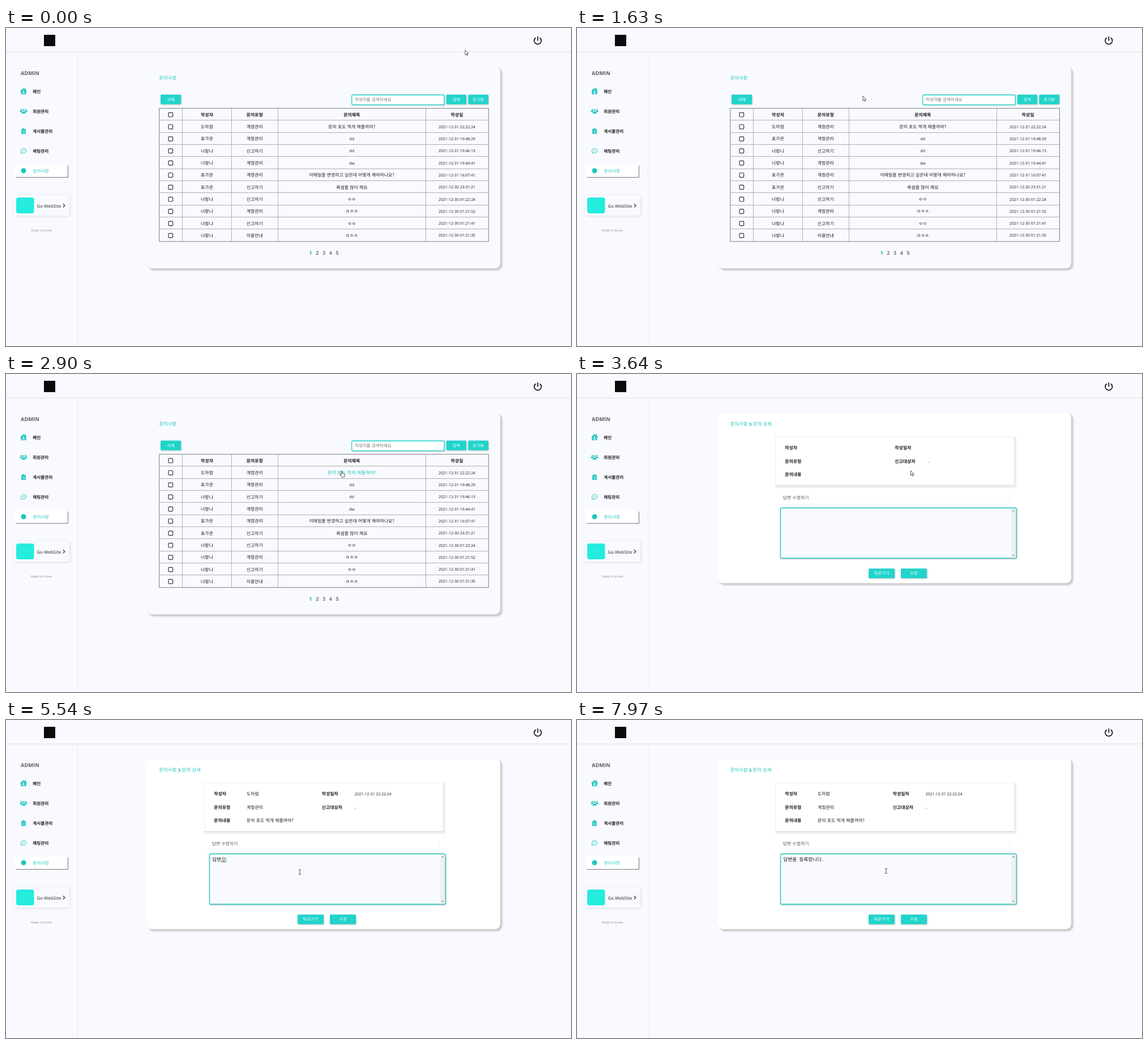
Write an HTML page that moves like this. It is 998 px wide and 561 px high and loops after 8000 ms.

```html
<!DOCTYPE html>
<html lang="ko">
<head>
<meta charset="utf-8">
<title>문의사항</title>
<style>
html, body { margin: 0; width: 100%; height: 100%; overflow: hidden; background: #f9faff; }
svg { display: block; width: 998px; height: 561px; }
text { font-family: "Noto Sans CJK KR", "Noto Sans KR", "Noto Sans CJK", sans-serif; text-rendering: geometricPrecision; white-space: pre; }
.lat { font-family: "Open Sans", "Noto Sans", sans-serif; }
.mono { font-family: "Noto Sans Mono CJK KR", "Noto Sans CJK KR", monospace; }
.card { filter: drop-shadow(3.5px 3.5px 1.5px #c9cac9) drop-shadow(0 0 .6px #d4d5d6); }
.btn { filter: drop-shadow(1.5px 1.5px 1px #bcc2c4); }
.soft { filter: drop-shadow(1px 1px 2px #dadce1); }
</style>
</head>
<body>
<svg id="stage" viewBox="0 0 998 561" xmlns="http://www.w3.org/2000/svg"></svg>
<script>
const LOOP = 8000, TEAL = '#22c6be', FILL = '#21d4cb', BG = '#f9faff', INK = '#1c1c1e';
const stage = document.getElementById('stage');

// Text placed by its vertical middle
function text(x, mid, str, size, o = {}) {
  return `<text x="${x}" y="${(mid + size * .365).toFixed(2)}" font-size="${size}" fill="${o.fill || INK}"` +
    ` font-weight="${o.w || 400}" text-anchor="${o.at || 'start'}" class="${o.cls || ''}" id="${o.id || ''}">${str}</text>`;
}
const mid = (x, y, str, size, o = {}) => text(x, y, str, size, { ...o, at: 'middle' });
const rect = (x, y, w, h, fill, more = '') =>
  `<rect x="${x}" y="${y}" width="${w}" height="${h}" fill="${fill}" ${more}/>`;
const line = (x1, y1, x2, y2, color, w = 1) =>
  `<path d="M${x1} ${y1}L${x2} ${y2}" stroke="${color}" stroke-width="${w}"/>`;
const chevron = (x, y, color, w) =>
  `<path d="M${x} ${y - 3}l3 3l-3 3" fill="none" stroke="${color}" stroke-width="${w}"/>`;
const button = (x, y, w, label) =>
  rect(x, y, w, 17, FILL, 'rx="1.5" class="btn"') + mid(x + w / 2, y + 8.5, label, 7.3, { fill: '#fff' });

function frame() {
  const items = [[112, '메인'], [147.5, '회원관리'], [182.5, '게시물관리'], [217.5, '채팅관리']];
  return rect(0, 0, 998, 561, BG) +
    line(0, 42, 998, 42, '#e6e8ed', 1.4) + line(0, 43.5, 998, 43.5, '#f2f4f8', 1.5) +
    line(126, 43, 126, 561, '#eceef3', 1.4) +
    rect(67, 12, 20, 20, '#0b0b0b') +
    '<path d="M935.7 17.2a6.3 6.3 0 1 0 7.2 0M939.3 15v7.4" fill="none" stroke="#111" stroke-width="1.7"/>' +
    text(26, 79.3, 'ADMIN', 9.3, { w: 700, fill: '#5c5e62', cls: 'lat' }) +
    items.map(([y, s]) => text(47.3, y, s, 7.6, { w: 700 })).join('') +
    icons() +
    rect(16, 241, 93, 22, '#fff', 'rx="2" style="filter:drop-shadow(1px 1px .7px #777)"') +
    `<circle cx="31" cy="251.7" r="4.5" fill="${TEAL}"/>` +
    text(47.5, 252.3, '문의사항', 7.7, { fill: TEAL, w: 500 }) +
    rect(14, 295, 98, 36, BG, 'rx="3" class="soft"') +
    rect(18, 299, 31.5, 28, '#25ecdf', 'rx="4"') +
    text(54.5, 314.2, 'Go WebSite', 7.8, { w: 600, fill: '#55585c', cls: 'lat' }) +
    chevron(100.8, 313.3, '#44474b', 1.5) +
    mid(62.5, 357, 'Made in Korea', 5.5, { fill: '#8b8d91', cls: 'lat' });
}

function icons() {
  const person = (x, y, r) => `<circle cx="${x}" cy="${y}" r="${r}"/>` +
    `<path d="M${x - r * 1.9} ${y + r * 3.4}v-${r}q0-${r} ${r}-${r}h${r * 1.8}q${r} 0 ${r} ${r}v${r}z"/>`;
  return `<g fill="${TEAL}">
    <path d="M31 106l6 5.2l-.8 .8l-.6-.5v5.3h-9.2v-5.3l-.6 .5l-.8-.8zM33.4 106.3h1.8v3h-1.8z"/>
    <circle cx="31" cy="111.2" r="1.2" fill="${BG}"/><path d="M28.8 115.3q0-2 2.2-2t2.2 2z" fill="${BG}"/>` +
    person(27, 144, 1.3) + person(35, 144, 1.3) +
    `<g stroke="${BG}" stroke-width=".5">${person(31, 144.8, 1.9)}</g>
    <path d="M27 178.2h2.4a1.6 1.6 0 0 1 3.2 0h2.4v8.8h-8z"/>
    <path d="M28.4 181.3h1m1 0h3.2m-5.2 2h1m1 0h3.2m-5.2 2h1m1 0h3.2" stroke="${BG}" stroke-width=".7"/>
    <path d="M31 212.8c3 0 4.9 1.8 4.9 3.9s-1.9 3.9-4.9 3.9c-.9 0-1.5-.1-2.2-.4q-1.2 .9-2.5 .9q.8-1 .9-2c-.7-.7-1.1-1.5-1.1-2.4c0-2.1 1.9-3.9 4.9-3.9z" fill="none" stroke="${TEAL}" stroke-width="1"/>
    <circle cx="28.9" cy="216.7" r=".7"/><circle cx="31" cy="216.7" r=".7"/><circle cx="33.1" cy="216.7" r=".7"/></g>`;
}

const ACC = '계정관리', REP = '신고하기', A = '도하람', B = '표가온', C = '너랑나';
const TITLE = '문의 포도 먹게 해줄꺼야?', DATE = '2021-12-31 22:22:24';
const rows = [
  [A, ACC, TITLE, DATE],
  [B, ACC, 'dd', '2021-12-31 19:48:29'],
  [C, REP, 'dd', '2021-12-31 19:46:13'],
  [C, ACC, 'dw', '2021-12-31 19:44:41'],
  [B, ACC, '이메일을 변경하고 싶은데 어떻게 해야하나요?', '2021-12-31 16:07:41'],
  [B, REP, '욕설을 많이 해요', '2021-12-30 23:31:21'],
  [C, REP, 'ㅇㅇ', '2021-12-30 01:22:24'],
  [C, ACC, 'ㅁㅈㅇ', '2021-12-30 01:21:52'],
  [C, REP, 'ㅇㅇ', '2021-12-30 01:21:41'],
  [C, '이용안내', 'ㅁㅈㅇ', '2021-12-30 01:21:35']
];

function listPage() {
  const cols = [311.5, 398.5, 480.5, 741.5], centers = [355, 439.3, 610.8, 796.5];
  const top = 142, step = 21.32;
  let s = rect(249, 67.5, 624, 356.5, BG, 'rx="9" class="card"') +
    text(270.4, 88.2, '문의사항', 8.4, { fill: TEAL }) +
    button(273, 117.6, 36, '삭제') + button(777.7, 117.6, 35.3, '검색') + button(816.3, 117.6, 35.7, '초기화') +
    rect(610.8, 118, 163.2, 17.4, '#fff', `rx="2" stroke="${FILL}" stroke-width="1.3" class="btn"`) +
    text(616, 126.3, '작성자를 검색하세요', 7.55, { fill: '#777' });
  for (let i = 1; i < 11; i++) {
    const y = Math.round(top + i * step) - .5;
    s += line(270, y, 852.5, y, '#a6a8ad', .9);
  }
  s += cols.map(x => line(x, 142, x, 376.5, '#a6a8ad', .9)).join('') +
    rect(270.6, 141.6, 581.8, 235, 'none', 'stroke="#909296" stroke-width="1.2"');
  [['작성자', '문의유형', '문의제목', '작성일'], ...rows].forEach((r, i) => {
    const y = top + (i + .5) * step - .1;
    s += rect(287, y - 3.4, 7.6, 7.6, '#fff', 'rx="1.2" stroke="#333" stroke-width="1.2"');
    r.forEach((v, j) => {
      const lat = /^[a-z\d]/.test(v);
      s += mid(centers[j], y + .2, v, lat ? 6.9 : 7.9,
        { w: i ? 400 : 700, cls: lat ? 'lat' : '', id: v === TITLE ? 'link' : '' });
    });
  });
  for (let n = 1; n < 6; n++)
    s += mid(526.2 + n * 11.75, 397.2, n, 9, { w: 700, fill: n > 1 ? '#727478' : '#22b9a8', cls: 'lat' });
  return s;
}

function detailPage() {
  const bold = { w: 700 };
  const right = (x, dash) => text(x, 130.5, '작성일자', 7.9, bold) +
    text(x, 154, '신고대상자', 7.9, bold) + text(dash, 154.6, '-', 8, { cls: 'lat' });
  return rect(249, 67.5, 624, 301.5, '#fff', 'rx="9" class="card"') +
    text(270.4, 88.2, '문의사항', 8.4, { fill: TEAL, w: 500 }) + chevron(304.6, 88.7, TEAL, 1.6) +
    text(310.6, 88.2, '문의 상세', 8.4, { fill: TEAL, w: 500 }) +
    rect(350, 110.5, 426, 90.5, '#efefef') + rect(351, 111.5, 421, 84.5, '#fff') +
    line(351, 196.5, 772.5, 196.5, '#d6d6d6') + line(772.5, 111.5, 772.5, 197, '#e2e2e2') +
    text(367.3, 130.5, '작성자', 7.9, bold) + text(367.3, 154, '문의유형', 7.9, bold) +
    text(367.3, 177.3, '문의내용', 7.9, bold) +
    `<g id="blank">${right(561.2, 620.5)}</g><g id="data">${right(557.8, 615.5)}` +
    text(425, 130.5, A, 7.9) + text(425, 154, ACC, 7.9) + text(425, 177.3, TITLE, 7.9) +
    text(615.7, 130.8, DATE, 6.9, { cls: 'lat' }) + '</g>' +
    line(764.5, 207, 764.5, 229, '#f3f3f3') + line(351, 229.5, 764, 229.5, '#f8f8f8') +
    text(363.7, 217.7, '답변 수정하기', 7.9, { fill: '#55585c', w: 500 }) +
    rect(359.5, 236.3, 416.5, 88.7, BG, `rx="2" stroke="${TEAL}" stroke-width="1.4" class="btn"`) +
    rect(767, 237, 8.2, 87.3, '#f0f0f1') +
    '<path d="M769 242.2l2-2.2l2 2.2zM769 319l2 2.2l2-2.2z" fill="#7b7d80"/>' +
    text(364.4, 246, '', 8.6, { cls: 'mono', id: 'reply' }) +
    `<path id="under" stroke="${INK}" stroke-width=".7"/><path id="caret" stroke="${TEAL}" stroke-width=".8"/>` +
    button(515, 343.3, 46, '뒤로가기') + button(572, 343.3, 46, '수정');
}

// Pointers are drawn with the hot spot at 0,0
const pointers = `<g id="arrow" fill="#fff" stroke="#222" stroke-width=".75" stroke-linejoin="round">
  <path d="M0 0v8.4l1.9-1.8l1.3 2.9l1.4-.6l-1.3-2.9h2.6z"/></g>
  <g id="hand" fill="#fff" stroke="#222" stroke-width=".75" stroke-linejoin="round">
  <path d="M-.9 .6q.9-1 1.7 0v3.6q1.2-.6 1.7 .3q1.1-.4 1.5 .5q1.2-.2 1.3 .8v2.6q-.1 1.3-1 2.7h-4.1q-1.2-1.7-2.8-3.7q-.3-1.1 .7-1.1l1 .9z"/></g>
  <path id="beam" d="M-2.2-4q1.7-.2 2.2 .7q.5-.9 2.2-.7M-2.2 4.5q1.7 .2 2.2-.7q.5 .9 2.2 .7M0-3.3v7.1" fill="none" stroke="#222" stroke-width=".8"/>`;

stage.innerHTML = frame() + `<g id="list">${listPage()}</g><g id="detail">${detailPage()}</g>` + pointers;
const $ = id => document.getElementById(id);
const show = (id, on) => $(id).style.display = on ? '' : 'none';

const path = [
  [0, 811, 39], [930, 811, 39], [970, 808, 40], [1200, 808, 40], [1630, 505, 120], [2290, 505, 120],
  [2470, 519, 140], [2890, 593, 171], [3600, 593, 171], [3640, 589.5, 170.5], [3880, 589.5, 170.5],
  [4140, 519, 268], [7650, 519, 268], [7970, 546, 266], [8000, 546, 266]
];
function pointerAt(t) {
  const i = path.findIndex(p => p[0] > t);
  const [t0, x0, y0] = path[i - 1], [t1, x1, y1] = path[i];
  let k = (t - t0) / (t1 - t0);
  if (Math.abs(x1 - x0) > 100) k = k * k * (3 - 2 * k);
  return [x0 + (x1 - x0) * k, y0 + (y1 - y0) * k];
}

// Each key press of the Hangul input: time and the text so far
const keys = [
  [4840, 'ㄷ'], [5010, '다'], [5090, '답'], [5180, '답ㅂ'], [5270, '답벼'], [5350, '답변'],
  [5440, '답변ㅇ'], [5540, '답변으'], [5640, '답변을'], [5700, '답변을 '], [5770, '답변을 ㄷ'],
  [5870, '답변을 드'], [5940, '답변을 등'], [6040, '답변을 등ㄹ'], [6140, '답변을 등로'],
  [6210, '답변을 등록'], [6310, '답변을 등록ㅎ'], [6400, '답변을 등록하'], [6470, '답변을 등록합'],
  [6610, '답변을 등록합ㄴ'], [6700, '답변을 등록합니'], [6810, '답변을 등록합닏'],
  [6910, '답변을 등록합니다'], [7110, '답변을 등록합니다.']
];

function draw(t) {
  const detail = t >= 3640;
  show('list', !detail);
  show('detail', detail);
  show('blank', t < 3670);
  show('data', t >= 3670);

  const [x, y] = pointerAt(t);
  const hover = !detail && x > 568 && x < 654 && y > 167 && y < 181;
  const beam = detail && y > 236;
  const link = $('link');
  link.setAttribute('fill', hover ? TEAL : INK);
  link.setAttribute('font-weight', hover ? 500 : 400);
  link.setAttribute('font-size', hover ? 8.2 : 7.9);
  for (const [id, on] of [['arrow', !hover && !beam], ['hand', hover], ['beam', beam]]) {
    show(id, on);
    $(id).setAttribute('transform', `translate(${x.toFixed(2)} ${y.toFixed(2)})`);
  }

  let str = '';
  for (const [at, s] of keys) if (t >= at) str = s;
  const reply = $('reply');
  reply.textContent = str;
  const end = 364.9 + (str ? reply.getComputedTextLength() : 0);
  $('caret').setAttribute('d', `M${end + .4} 241.7V250`);
  show('caret', t >= 4300 && t < 7670);
  $('under').setAttribute('d', `M${end - 8.6} 250.2H${end - .3}`);
  show('under', /[^ .]$/.test(str));
}

const start = performance.now();
function tick() {
  draw((performance.now() - start) % LOOP);
  requestAnimationFrame(tick);
}
draw(0);
requestAnimationFrame(tick);
</script>
</body>
</html>
```
